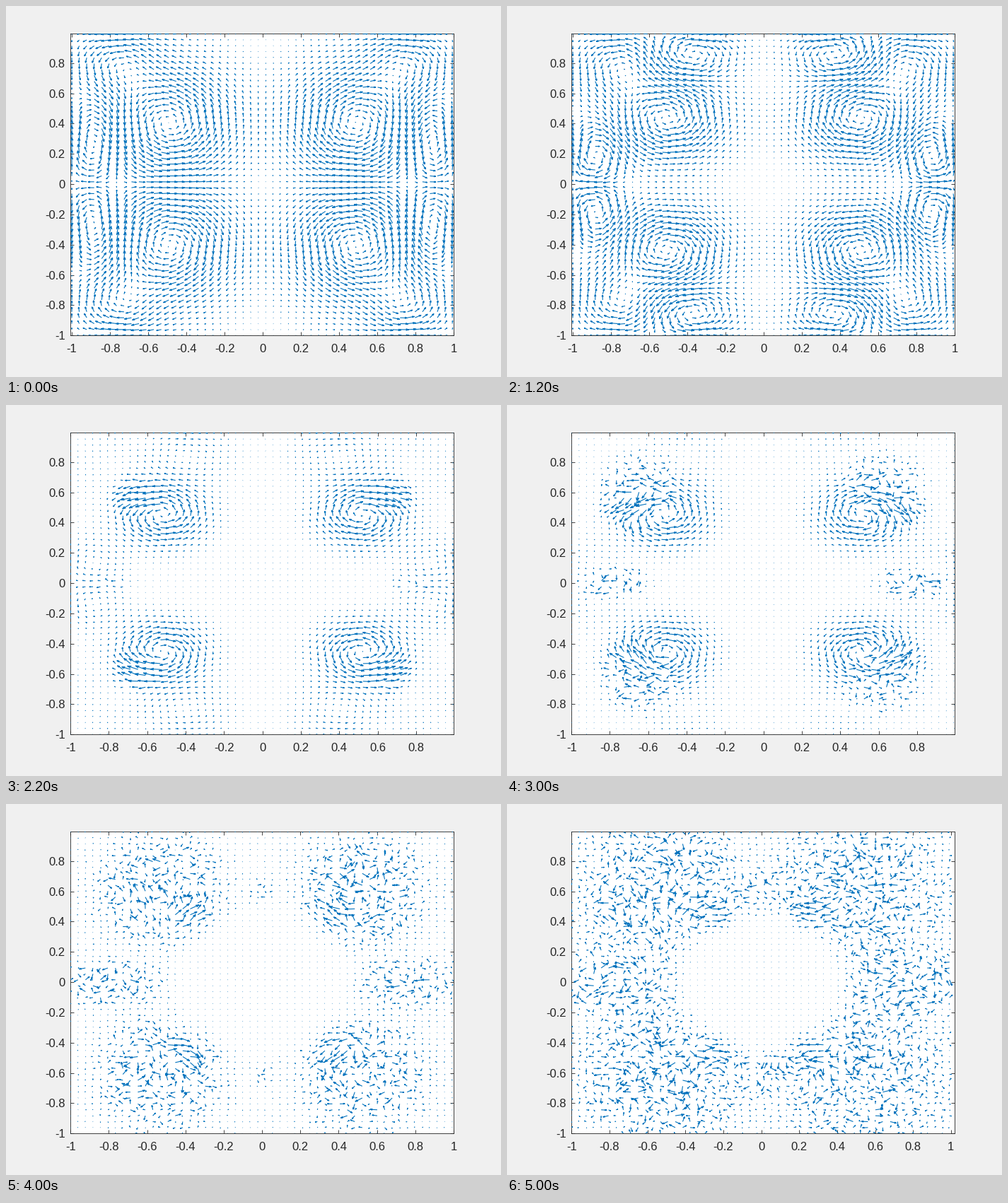
Animation, 700 px wide and 525 px high, one loop 5100 ms. Source, as a matplotlib script:

```python
import numpy as np
import matplotlib as mpl
import matplotlib.pyplot as plt
from matplotlib.animation import FuncAnimation
from matplotlib.ticker import FuncFormatter, MultipleLocator

FRAMES, INTERVAL = 51, 100
INK, BLUE = "#262626", "#0072BD"
PX = 0.72  # points per pixel at 100 dpi
WIDTH, HEIGHT = 700, 525

mpl.rcParams["path.simplify"] = False
mpl.rcParams["font.family"] = "Liberation Sans"

# Every fifth node of a periodic 256-node grid, folded into one quadrant
nodes = -1 + np.arange(0, 256, 5) * 2 / 256
X, Y = (g.ravel() for g in np.meshgrid(nodes, nodes))
QX, QY = np.abs(X), np.abs(Y)
MAX_LEN = 1.1 * np.hypot(*[np.ptp(nodes) / len(nodes)] * 2)

rng = np.random.default_rng(7)
angle = rng.uniform(0, 2 * np.pi, (2, X.size))
size = rng.uniform(.1, .9, (2, X.size))
rate = rng.uniform(.25, .7, X.size)


def ramp(n, start, end):
    return np.clip((n - start) / (end - start), 0, 1)


def smooth(n, start, end):
    t = ramp(n, start, end)
    return t * t * (3 - 2 * t)


def bump(cx, cy, wx, wy, power=1):
    r2 = ((QX - cx) / wx) ** 2 + ((QY - cy) / wy) ** 2
    return np.exp(-(r2 ** power) / 2)


def swirl(cx, cy, wx, wy, strength):
    """Clockwise vortex with mirror images beyond the quadrant's edges."""
    flow = np.zeros((2, X.size))
    m = strength * np.sqrt(wx * wy)
    for ix, sx in ((cx, 1), (-cx, -1), (2 - cx, -1)):
        for iy, sy in ((cy, 1), (-cy, -1), (2 - cy, -1)):
            g = m * sx * sy * bump(ix, iy, wx, wy)
            flow += g * (QY - iy) / wy ** 2, -g * (QX - ix) / wx ** 2
    return flow


def jet(cx, cy, width, degrees, strength):
    a = np.radians(degrees)
    g = strength * bump(cx, cy, width, width)
    return np.array([g * np.cos(a), g * np.sin(a)])


def vortices(n):
    drift, shrink = ramp(n, 0, 22), ramp(n, 8, 22)
    calm = 1 - smooth(n, 14, 24)
    main = swirl(.49 + .03 * drift, .40 + .06 * drift, .19 - .07 * shrink,
                 .215 - .11 * drift, 1 - .9 * smooth(n, 30, 42))
    outer = swirl(.88, .28 - .17 * drift, .09, .18 - .07 * drift,
                  -.6 * calm - .15 * (1 - ramp(n, 22, 45)))
    upper = swirl(.74, .80 - .04 * drift, .14, .15, .6 * calm)
    top = swirl(.34 + .07 * drift, .89 - .06 * drift, .13, .11,
                -.8 * ramp(n, 0, 14) * (.15 + .85 * calm)
                * (1 - ramp(n, 22, 40)))
    return main + outer + upper + top


def jets(n):
    turn, inward = ramp(n, 20, 30), ramp(n, 36, 50)
    out = jet(.63 + .05 * turn, .60 - .11 * turn, .07, -32 * turn,
              .8 * ramp(n, 14, 22) * (1 - smooth(n, 30, 38)))
    back = jet(.44 - .15 * inward, .46 + .02 * inward, .07,
               135 + 40 * inward, .75 * smooth(n, 29, 40))
    return out + back


def turbulence(n):
    """Per-arrow random motion inside patches that spread with time."""
    grow, late = ramp(n, 18, 50), ramp(n, 34, 50)
    r, side, mid = .05 + .28 * grow, .05 + .2 * grow, .02 + .1 * late
    rough = .8 * min(1, 3 * grow) * (
        bump(.65 - .12 * smooth(n, 24, 42), .61, r, 1.1 * r, 1.6)
        + bump(.77, 0, side, .62 * side, 1.6))
    rough += .45 * late ** .5 * bump(0, .6, mid, mid, 1.6)
    hollow = 1 / (1 + np.exp((.46 - np.hypot(X, Y)) / .03))
    rough = (rough + .06 * grow) * hollow
    wave = np.array([np.cos(rate * n), np.sin(rate * n)]) * size * rough
    return np.array([(wave * np.cos(angle)).sum(0),
                     (wave * np.sin(angle)).sum(0)])


def field(n):
    flow = (vortices(n) + jets(n)) * [np.sign(X), np.sign(Y)]
    flow += turbulence(n)
    speed = np.hypot(*flow) + 1e-12
    length = np.tanh(1.3 * speed)  # strong flow saturates
    length = np.maximum(length / length.max() * MAX_LEN, .0012)
    return flow / speed * length


def arrows(n):
    """Shafts and open heads as one polyline broken by NaN."""
    u, v = field(n)
    tx, ty = X + u, Y + v
    gap = np.full(X.size, np.nan)
    a, b = .33, .38
    xs = [X, tx, gap, tx - a * (u + b * v), tx, tx - a * (u - b * v), gap]
    ys = [Y, ty, gap, ty - a * (v - b * u), ty, ty - a * (v + b * u), gap]
    return np.array(xs).T.ravel(), np.array(ys).T.ravel()


fig = plt.figure(figsize=(WIDTH / 100, HEIGHT / 100), dpi=100,
                 facecolor="#F0F0F0")
left, right, top, bottom = 91.2, 633.2, 39.2, 466.2
ax = fig.add_axes([left / WIDTH, 1 - bottom / HEIGHT,
                   (right - left) / WIDTH, (bottom - top) / HEIGHT])
ax.set_ylim(-1, .9945)
label = FuncFormatter(lambda value, _: f"{round(value, 1) + 0:g}")
for axis in (ax.xaxis, ax.yaxis):
    axis.set_major_locator(MultipleLocator(.2))
    axis.set_major_formatter(label)
ax.tick_params(direction="in", top=True, right=True, length=5.4 * PX,
               width=.85 * PX, color=INK, labelcolor=INK, labelsize=12)
ax.tick_params(axis="x", pad=12 * PX)
ax.tick_params(axis="y", pad=7.5 * PX)
for spine in ax.spines.values():
    spine.set(color=INK, linewidth=.85 * PX)
line, = ax.plot([], [], color=BLUE, lw=1.1 * PX, zorder=3,
                solid_capstyle="butt", solid_joinstyle="miter")


def draw(n):
    early = 1 - ramp(n, 17, 20)
    ax.set_xlim(-1 - .007 * early,
                .9965 + .0035 * early + .0235 * smooth(n, 36, 50))
    line.set_data(*arrows(n))
    return line,


anim = FuncAnimation(fig, draw, frames=FRAMES, interval=INTERVAL,
                     repeat=True, repeat_delay=0, blit=False)
plt.show()
```
